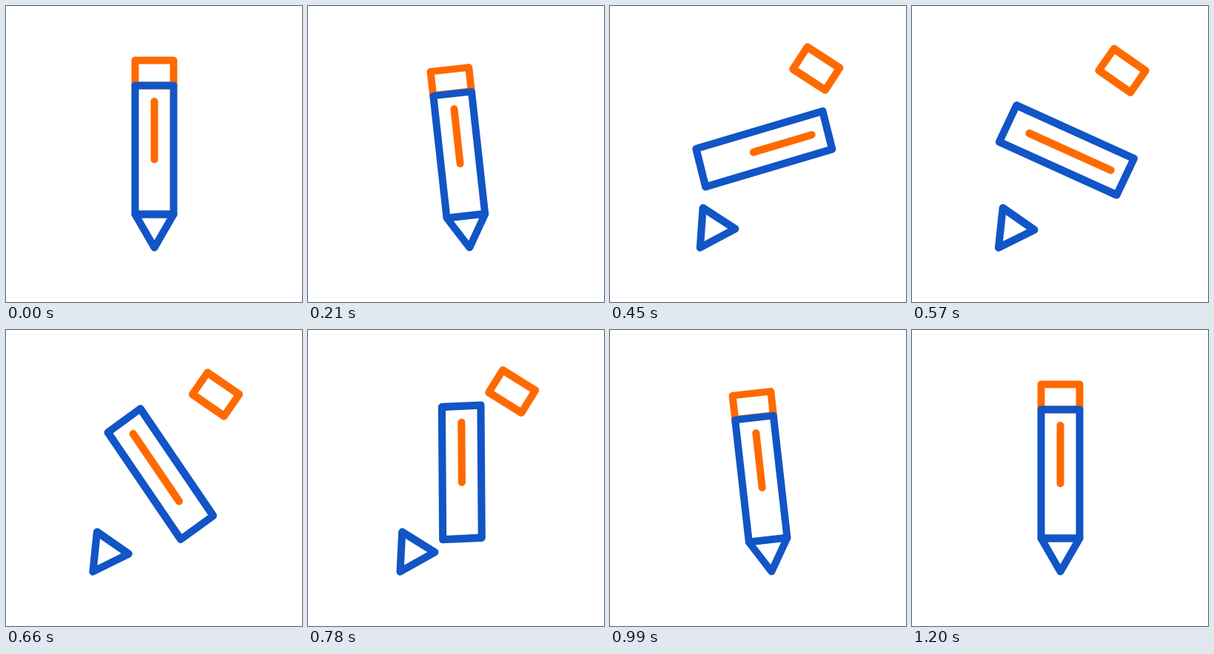
An HTML page for the animation above (3320 ms loop, 400 by 400 pixels).

```html
<!DOCTYPE html>
<html lang="en">
<head>
<meta charset="utf-8">
<title>Pencil</title>
<style>
  html, body { margin: 0; width: 100%; height: 100%; overflow: hidden; background: #fff; }
  svg { display: block; width: 100%; height: 100%; }
  path { fill: none; stroke-width: 10; stroke-linecap: round; stroke-linejoin: round; }
  .orange { stroke: #ff6a00; }
  .blue { stroke: #1155c6; }
</style>
</head>
<body>
<svg viewBox="0 0 400 400">
  <!-- the pencil's point is the local origin -->
  <g id="pencil">
    <path id="eraser" class="orange" d="M-26-253H26V-219H-26Z"/>
    <g id="body">
      <path class="blue" d="M-26-87H26V87H-26Z"/>
      <path id="line" class="orange"/>
    </g>
    <path class="blue" d="M-26-45H26L0 0Z"/>
  </g>
</svg>
<script>
  const LOOP = 3320, TICK = 30, MOVE = 1200, LEAN = 200;
  const el = id => document.getElementById(id);
  const pencil = el('pencil'), eraser = el('eraser'), body = el('body'), line = el('line');

  const mix = (a, b, k) => a + (b - a) * k;
  const span = (t, a, b) => Math.min(1, Math.max(0, (t - a) / (b - a)));
  const smooth = p => p * p * (3 - 2 * p);

  function bezier(p, x1, y1, x2, y2) {
    const at = (s, a, b) => 3 * (1 - s) * (1 - s) * s * a + 3 * (1 - s) * s * s * b + s * s * s;
    let lo = 0, hi = 1;
    for (let i = 0; i < 30; i++) {
      const mid = (lo + hi) / 2;
      if (at(mid, x1, x2) < p) lo = mid; else hi = mid;
    }
    return at(hi, y1, y2);
  }

  function draw(t) {
    // lean and burst play forwards, then backwards
    const m = Math.max(0, Math.min(t, MOVE - t));
    const lean = Math.pow(span(m, 0, LEAN), 1.2);
    const burst = bezier(span(m, LEAN, MOVE / 2), 0.25, 0.25, 0, 1);

    const x = mix(mix(200.5, 221.3, lean), 116.8, burst);
    const angle = mix(-7.6 * lean, 35, burst);
    const stretch = mix(1 - 0.05 * lean, 1.05, burst);
    const gap = 42 * burst;
    const turn = 180 * smooth(span(t, LEAN, MOVE - LEAN));

    // the line slides from one end of the body to the other
    const head = 13 + 52.5 * smooth(span(t, 430, 625));
    const tail = -65.5 + 52.5 * smooth(span(t, 575, 770));

    pencil.setAttribute('transform', `translate(${x} 326.5) rotate(${angle}) scale(1 ${stretch})`);
    eraser.setAttribute('transform', `translate(0 ${-gap})`);
    body.setAttribute('transform', `translate(0 ${-132 - gap / 2}) rotate(${turn})`);
    line.setAttribute('d', `M0 ${tail}V${head}`);
  }

  const start = performance.now();
  function frame() {
    const t = (performance.now() - start) % LOOP;
    draw(Math.floor(t / TICK) * TICK);
    requestAnimationFrame(frame);
  }
  frame();
</script>
</body>
</html>
```
